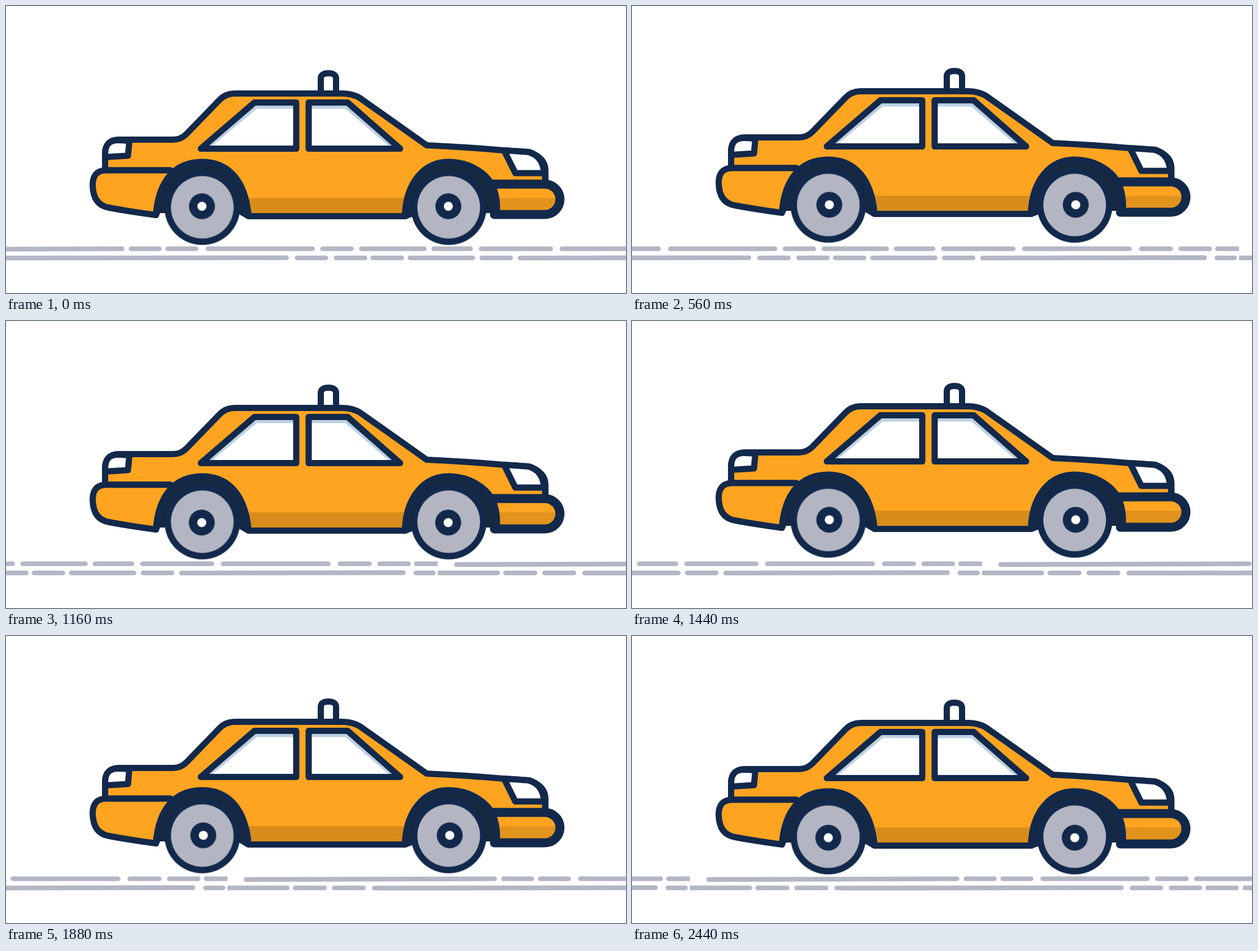
An HTML page without scripts for the animation above (2480 ms loop, 1098 by 510 pixels).

```html
<!DOCTYPE html>
<html lang="en">
<head>
<meta charset="utf-8">
<title>Taxi</title>
<style>
  html, body { margin: 0; width: 100%; height: 100%; overflow: hidden; background: #fff; }
  svg { display: block; width: 1098px; height: 510px; }

  .line { stroke: #13294b; stroke-width: 11; stroke-linejoin: round; stroke-linecap: round; fill: none; }
  .paint { fill: #ffa421; }
  .white { fill: #fff; }
  .glass { fill: #bcd0e1; }
  .arch { fill: #16283f; }
  .navy { fill: #13294b; }
  .thick { stroke-width: 16; }
  .dash { fill: none; stroke: #b3b6c4; stroke-width: 8.4; stroke-linecap: round; }

  .road, .car, .hub { animation: 2480ms -2ms infinite; }
  .road { animation-name: drive; animation-timing-function: steps(62); }
  .hub { animation-name: spin; animation-timing-function: steps(62); }
  .car { animation-name: bob; animation-timing-function: steps(5); }

  @keyframes drive { to { transform: translateX(-1282.7px); } }
  @keyframes spin { to { transform: rotate(2029deg); } }

  /* 400 ms bounce, cut short when the loop restarts */
  @keyframes bob {
    0%, 16.129%, 32.258%, 48.387%, 64.516%, 80.645% { transform: translateY(0); }
    8.0645%, 24.1935%, 40.3226%, 56.4516%, 72.5806%, 88.7097% { transform: translateY(-5px); }
    96.7742% { transform: translateY(0); animation-timing-function: steps(2); }
    100% { transform: translateY(-2px); }
  }
</style>
</head>
<body>
<svg viewBox="0 0 1098 510">
  <defs>
    <clipPath id="edge"><rect y="420" width="1632" height="40"/></clipPath>
    <g id="strip" clip-path="url(#edge)">
      <path class="dash" d="M33 432.7L473 431.4M489 431.4H539M554 431.4H604M625 431.4H810M828 431.4H879
        M897 431.4H1008M1025 431.4H1090M1109 431.4H1232M1252 431.4H1438M1459 431.4H1511
        M1529 431.4H1580M1594 431.4H1645"/>
      <path class="dash" d="M-9 447.6H106M120 447.6H172M189 447.6H241M260 447.9L764 447.4M783 447.6H834
        M852 447.6H903M917 447.6H968M983 447.6H1094M1110 447.6H1161M1178 447.9L1571 447.2
        M1593 447.6H1624"/>
    </g>
    <g id="wheel">
      <circle class="navy" r="67"/>
      <circle r="55.5" fill="#b3b6c2"/>
    </g>
    <g id="cap" transform="translate(-.6 -1.75)">
      <circle class="navy" r="23"/>
      <circle class="white" r="8"/>
    </g>
  </defs>

  <g class="road">
    <use href="#strip" x="-267.4"/>
    <use href="#strip" x="1364.6"/>
  </g>

  <g class="car">
    <!-- beacon -->
    <path class="line white" stroke-linecap="butt" d="M557.5 152V129Q557.5 119.5 571 119.5T584.5 129V152"/>

    <!-- body -->
    <path class="line paint" d="M175.5 292V262Q176 237.5 200 237.5H296Q310 237.5 320 227L378 167Q389 155.5 406 155.5H596
      Q612 155.5 626 163L745 247.5Q820 251 881 256.5L926 259.5Q955 270 955 292V316H862L706.5 373.5H429.5L291 292Z"/>
    <path fill="#d88c1b" d="M425 341H712V368H425Z"/>

    <!-- bumpers -->
    <path class="line paint" d="M291 292H176Q153.5 293 153.5 318Q154 354 183 358.5Q220 365.500 265.500 371.500L300 292"/>
    <path class="paint" d="M862 316.500H954A27 27 0 0 1 954 370.500H862Z"/>
    <path fill="#e2931c" d="M862 341H981Q981 370.500 954 370.500H862Z"/>
    <path class="line thick" d="M862 316.500H954A27 27 0 0 1 954 370.500H865"/>

    <!-- wheel arches -->
    <path class="arch" d="M265.500 368C270 310 300 277 347 277S424 310 429.500 368Z"/>
    <path class="line" d="M265.500 371.500C270 310 300 277 347 277S424 310 429.500 373.500H706.500"/>
    <path class="arch" d="M706.500 368C708 312 742 277 783 277S855 300 864 325Q871 345 869 368Z"/>
    <path class="line" d="M706.500 373.500C708 312 742 277 783 277S855 300 864 325Q871 345 869 367"/>

    <!-- lights -->
    <path class="line white" d="M175.500 268.500V262Q176 237.500 200 238.500L218.500 239.500L216 266Z"/>
    <path class="line white" d="M882 256.500L926 259.500Q951 267 953 297H902Z"/>
    <path class="line" d="M926 259.500Q955 270 955 292V310"/>

    <!-- windows -->
    <path class="glass" d="M345 253.500L440 171.500H514V253.500Z"/>
    <path class="white" d="M366 248L444 182.500H510V250H363Z"/>
    <path class="line" d="M345 253.500L440 171.500H514V253.500Z"/>
    <path class="glass" d="M536 171.500H605L698 253.500H536Z"/>
    <path class="white" d="M540 182.500H601L677 248V250H540Z"/>
    <path class="line" d="M536 171.500H605L698 253.500H536Z"/>

    <!-- wheels -->
    <g transform="translate(347.600 357.600)">
      <use href="#wheel"/>
      <g class="hub"><use href="#cap"/></g>
    </g>
    <g transform="translate(784 357.600)">
      <use href="#wheel"/>
      <g class="hub"><use href="#cap"/></g>
    </g>
  </g>
</svg>
</body>
</html>
```
